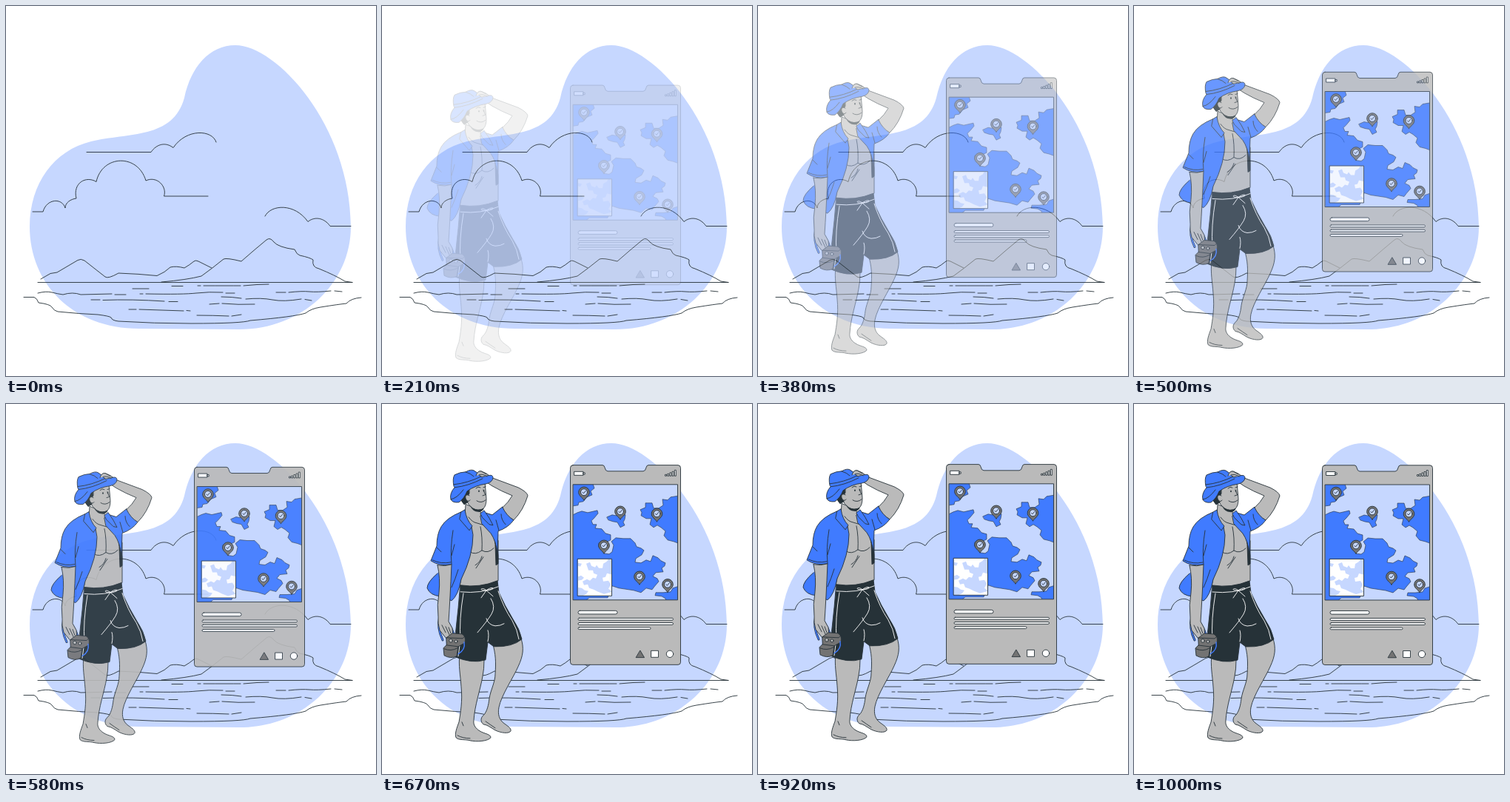
An HTML page that plays this animation: 500x500 px, repeating every 1040 ms.

```html
<!DOCTYPE html>
<html lang="en">
<head>
<meta charset="utf-8">
<title>Traveller and map</title>
<style>
  html, body { margin: 0; width: 100%; height: 100%; overflow: hidden; background: #fff; }
  svg { display: block; width: 100%; height: 100%; }
  .line { fill: none; }
  .blue { fill: #407bff; }
  .pale { fill: #c6d7ff; }
  .grey { fill: #bababa; }
  .mid { fill: #737373; }
  .dark { fill: #263238; }
  .white { fill: #fff; }
  .bare { stroke: none; }
  .stitch { fill: none; stroke: #fff; }
  #rise { opacity: 0; }
</style>
</head>
<body>
<svg viewBox="0 0 500 500" stroke="#263238" stroke-width=".9" stroke-linecap="round" stroke-linejoin="round">
  <defs>
    <clipPath id="screen"><path d="M258.500 109H399.500V265H258.500Z"/></clipPath>
    <clipPath id="inset"><path d="M264.500 209.500H310.500V259.500H264.500Z"/></clipPath>
    <g id="pin">
      <path class="mid" d="M0 10C-3 6-7.300 4-7.300-.5A7.300 7.300 0 0 1 7.300-.5C7.300 4 3 6 0 10Z"/>
      <circle class="pale" cy="-.6" r="4.500"/>
      <path class="line" d="M-2-.5-.6 1 2.200-2.400"/>
    </g>
  </defs>

  <path class="pale bare" d="M310 53C365 53 465 160 466 298C466 375 400 437 315 437L180 436C90 436 32 375 32 298C32 240 65 195 115 183C165 171 226 180 241 124C250 82 275 53 310 53Z"/>

  <g class="line">
    <path d="M109 197.500H196C203 187 215 183 226 191.500C244 165 279 167 284 184"/>
    <path d="M36 278H50C55 260 76 259 80 273C80 266 87 261 95 260C90 239 108 229 122 237.500C130 201 178 199 189 236C204 229 218 244 213.500 257H273"/>
    <path d="M350 284C358 268 390 266 408 291.500C417 284 430 286 438 297.500H466"/>
    <path d="M47 369L60 361.500 69 360 97 343.500Q101 341 106 344L134 366Q138 369 152 361Q180 362 204 364.500Q215 360 222 353Q230 351 241 354Q248 350 254 345Q256 343 260 345L278 354"/>
    <path d="M210 373Q245 370 264 365Q278 355 294 342Q298 340 318 345Q335 330 352 316Q357 312 362 319Q368 326 390 329Q393 336 397 337Q411 340 415 343Q413 353 423 355Q445 364 458 372L468 373.500"/>
    <path d="M43 373.500H468"/>
    <path d="M24 393.500H38Q42 395 44 401Q60 403 62 407Q65 412 70 413Q100 416 124 417Q140 419 142 421Q143 425 152 426Q200 429 250 429Q320 429 330 425Q390 420 405 415Q412 409 425 407Q450 403 460 402Q466 395 480 394"/>
    <path d="M43 388Q54 385 62 387T77 390Q90 386 101 390L143 389M147 390H162M171 382H193M181 389H185M189 389Q240 390 257 388T293 387M224 378.500H239M259 378H263M267 378Q300 378 317 378M321 378Q340 376 355 376M297 388H309M365 387H378M382 387Q400 385 410 386T439 385M444 385L454 386M115 397H127M131 397.500Q170 396 214 399M220 399.500H232M291 393Q306 393 318 395M324 396Q345 394 360 397T399 396M404 396.500L413 398M166 410H176M180 410Q210 411 240 412M244 411.500L249 412M275 403L288 402M292 402Q314 404 336 403M258 418Q280 418 301 419M305 419L318 417"/>
  </g>

  <g id="rise">
    <!-- Phone -->
    <path class="grey" d="M258 82.800H298Q300.500 83 301 86Q302 91 305 91H353Q356 91 357 86Q357.500 83 360 82.800H400Q403.500 83 403.500 86.500V349Q403.500 352.500 400 352.500H258Q254.500 352.500 254.500 349V86.500Q254.500 83 258 82.800Z"/>
    <path class="white" d="M260 91.500H272V96.500H260ZM272 93H274.200V95.300H272Z"/>
    <path class="white" id="bars"/>
    <g clip-path="url(#screen)">
      <path class="pale bare" d="M258 109H400V265H258Z"/>
      <g class="blue" stroke-width=".6">
        <path d="M258 108H285L287 114 282 118 284 123 277 126 272 132 266 133 265 137 258 138Z"/>
        <path id="land" d="M258 150L264 147 270 145 278 147 291 144 292 148 287 154 283 158 285 163 290 163 288 168 297 169 302 175 309 177 309 184 303 187 293 188 293 193 300 202 307 203 311 200 313 191 310 186 316 181 326 182 336 182 342 188 344 193 350 195 354 198 351 204 343 209 342 214 350 215 357 211 363 213 366 205 373 208 377 212 383 215 382 219 378 222 380 227 370 228 366 233 372 236 374 240 368 247 365 251 357 249 350 255 340 252 320 249 311 246 305 262 280 262 273 268 258 268Z"/>
        <path d="M304 153L311 150 316 151 322 148 329 150 328 156 326 160 328 164 322 167 318 160 312 159 306 157Z"/>
        <path d="M402 124L390 126 386 130 379 129 380 137 374 141 367 141 365 134 356 134 356 140 349 143 351 147 350 151 357 155 364 155 362 163 367 167 372 164 377 167 383 172 381 178 386 184 394 186 402 189Z"/>
        <path d="M402 246L393 249 390 254 380 255 370 255 369 259 378 260 383 263 384 268H402Z"/>
      </g>
    </g>
    <path class="line" d="M258.500 109H399.500V265H258.500Z"/>
    <g clip-path="url(#inset)">
      <path class="white bare" d="M264 209H311V260H264Z"/>
      <g class="pale bare">
        <path d="M276 216L281 214 283 219 288 221 290 218 293 222 298 222 299 216 304 213 306 209H312V231L304 229 302 234 298 235 299 240 306 239 309 244 306 250 311 254 300 257 292 254 286 251 280 249 278 244 273 245 271 240 277 237 281 239 285 235 289 236 291 231 286 229 285 225 279 225Z"/>
        <path d="M264 234L269 232 273 235 270 238 264 239ZM264 248L270 249 274 252 279 253 276 257 270 260H264ZM265 215L270 216 268 220 265 219Z"/>
      </g>
    </g>
    <path class="line" d="M264.500 209.500H310.500V259.500H264.500Z"/>
    <g id="pins"></g>
    <g class="white">
      <rect x="265" y="279.500" width="53" height="4.600" rx="2.300"/>
      <rect x="265" y="289.500" width="128.500" height="2.800" rx="1.400"/>
      <rect x="265" y="295.700" width="128.500" height="2.800" rx="1.400"/>
      <rect x="265" y="302" width="98" height="2.800" rx="1.400"/>
      <path d="M364 333.500H373.500V342.500H364Z"/>
      <circle cx="389" cy="338" r="4.700"/>
    </g>
    <path class="mid" d="M349 333.500L354.500 342.800H343.500Z"/>

    <!-- Legs -->
    <path class="grey" d="M188 317C192 330 191 340 184 355C178 369 161 394 158 410C156 420 159 427 164 431C169 435 175 438 174 442C172 446 161 445 153 441C146 437 143 434 137 433C133 430 133 424 137 421C142 416 144 407 145 398C147 386 153 376 153 365C154 350 154 338 149 322Z"/>
    <path class="grey" d="M105 338C103 354 106 366 107 382C109 402 106 418 104 430C101 438 98 446 100 451C104 455 112 453 119 455C128 457 143 456 147 451C147 446 138 446 132 442C127 439 123 434 124 428C125 408 133 386 136 368Q138 359 138 346Z"/>
    <path class="line" d="M102 448Q109 452 119 452M140 429Q147 434 153 438M108 430L110 435"/>

    <!-- Torso, neck and head -->
    <path class="grey" d="M113 136L112 152 105 180 112 210 105 246Q130 250 157 239L157 205 153 175 139 158 132 144Z"/>
    <path class="line" d="M119 200Q126 205 135 198Q143 203 151 195M133 166Q136 180 135 198M126 218Q133 214 135 206M137 207L127 222M117 153Q122 160 128 161L138 164"/>
    <path class="grey" d="M112 113C113 124 113 132 119 138Q126 145 134 143C140 141 141 134 141 128L139 105Z"/>
    <path class="dark" d="M105 124Q104 114 120 107L120 112Q117 116 118 121L115 126 116 133 111 136Q106 131 105 124Z"/>
    <path class="grey" d="M118 124C114 121 111 125 114 130Q117 133 119 130"/>
    <path class="dark bare" d="M119 138Q126 146 138 141Q135 147 130 146Q123 146 119 138Z"/>
    <path class="line" d="M127 114Q130 111 133 113M137 113L140 112M137 116L139.500 123 136 124M128 131Q134 135 140 130"/>
    <g class="dark bare"><ellipse cx="131" cy="118" rx=".9" ry="1.300"/><ellipse cx="137.500" cy="117.500" rx=".8" ry="1.200"/></g>

    <!-- Shorts -->
    <path class="dark" d="M106 245Q132 249 156 239L158 255Q166 273 177 291Q186 304 189 318Q176 329 151 328L143 322 140 346Q121 352 97 341Q99 309 103 276Z"/>
    <path class="stitch" d="M106 254Q134 257 157 247M110 256Q104 292 106 319L103 341M157 253Q164 275 176 293Q183 305 185 318M147 263Q154 274 148 284T129 309M141 290Q144 299 153 300Q160 300 165 297M143 321Q145 312 143 306M141 252C134 246 130 253 141 252C150 245 156 251 141 252L134 262M141 252L150 260"/>

    <!-- Shirt -->
    <path class="blue" d="M75 229Q61 241 61 249Q65 259 79 260L94 266Q103 259 107 237Q123 205 123 177L121 166 107 146Q87 154 80 166Q74 176 74 192L66 212Q78 220 93 217"/>
    <path class="dark" d="M150 169L157 185 157 216 154 218 153 190Z"/>
    <path class="blue" d="M133 151L139 147 149 150 163 139Q169 151 178 157Q171 167 157 172L156 202Q154 185 147 175L135 162Z"/>
    <path class="blue" d="M107 146L112 143Q114 157 122 165L118 171 105 156ZM133 148L138 144Q146 155 150 164L145 163 136 154Z"/>
    <path class="line" d="M96 171Q92 195 94 217M98 190L94 205M103 224Q99 237 94 248M74 194L80 200M161 149Q161 157 167 163M154 157L158 171M68 211Q80 217 93 214"/>

    <!-- Raised arm -->
    <path class="grey" d="M163 140Q171 133 176 124Q161 118 149 111L140 105 129 97Q128 91 134 91Q141 93 149 100L184 113Q196 119 197 124Q191 144 178 157Q168 151 163 140Z"/>
    <path class="blue" d="M97 111Q95 101 98 96Q106 92 113 92Q120 88 124 90Q130 93 134 99L143 97Q150 95 150 100Q149 106 141 108Q126 110 115 118Q111 128 104 133Q95 134 93 129Q91 121 98 113Z"/>
    <path class="line" d="M97 109Q116 107 134 98M98 113Q117 111 136 101M113 92Q120 94 124 98M93 129Q101 128 110 116"/>
    <path class="grey" d="M127 97Q129 90 134 91L141 95M131 96Q136 94 142 98" />

    <!-- Lowered arm and camera -->
    <path d="M78 287Q74 303 82 319M80 288Q92 295 98 314" fill="none" stroke="#263238" stroke-width="3"/>
    <path d="M78 287Q74 303 82 319M80 288Q92 295 98 314" fill="none" stroke="#407bff" stroke-width="1.600"/>
    <path class="grey" d="M75 218Q79 235 77 255Q74 272 76 288Q75 296 78 306L86 316 91 320 96 315 95 303 90 294Q92 265 94 217Q85 220 75 218Z"/>
    <path class="line" d="M81 299L86 309M86 301L91 312M90 302L93 310"/>
    <path class="mid" d="M87 316L95 310 108 311Q114 314 112 323L103 328 101 341Q93 345 84 340L83 330 87 326Z"/>
    <path class="line" d="M87 316L109 317 112 314M84 331Q93 335 102 330M87 326L103 328"/>
    <g class="grey"><circle cx="93" cy="320" r="2.300"/><circle cx="100" cy="321" r="2"/></g>
    <path d="M111 322Q113 332 103 338" fill="none" stroke="#407bff" stroke-width="1.400"/>
  </g>
</svg>
<script>
  const rise = document.getElementById('rise');
  const LOOP = 1040, FPS = 24, DROP = 30;

  document.getElementById('pins').innerHTML =
    [[273, 120], [322, 146], [371.5, 149], [300, 192], [348, 234], [386, 244.5]]
      .map(([x, y]) => `<use href="#pin" x="${x}" y="${y}"/>`).join('');
  document.getElementById('bars').setAttribute('d',
    [1.5, 2.5, 4, 5.5, 7.5].map((h, i) => `M${382.5 + i * 3.2} 97v${-h}h2v${h}z`).join(''));

  const bezier = (a, b, s) => 3 * (1 - s) ** 2 * s * a + 3 * (1 - s) * s * s * b + s ** 3;

  function ease(x) {
    let lo = 0, hi = 1;
    for (let i = 0; i < 30; i++) {
      const s = (lo + hi) / 2;
      if (bezier(.36, .5, s) < x) lo = s; else hi = s;
    }
    return bezier(-.01, 1.38, lo);
  }

  // Motion is stepped at 24 per second, on a 10 ms clock
  function draw(ms) {
    const step = Math.floor((Math.floor(ms / 10) * 10 + 4) * FPS / 1000);
    const p = ease(Math.min(1, (step + .5) / FPS));
    rise.style.opacity = step < 3 ? 0 : Math.min(1, p);
    rise.setAttribute('transform', `translate(0 ${(DROP * (1 - p)).toFixed(2)})`);
  }

  const start = performance.now();
  function tick() {
    draw((performance.now() - start) % LOOP);
    requestAnimationFrame(tick);
  }
  tick();
</script>
</body>
</html>
```
